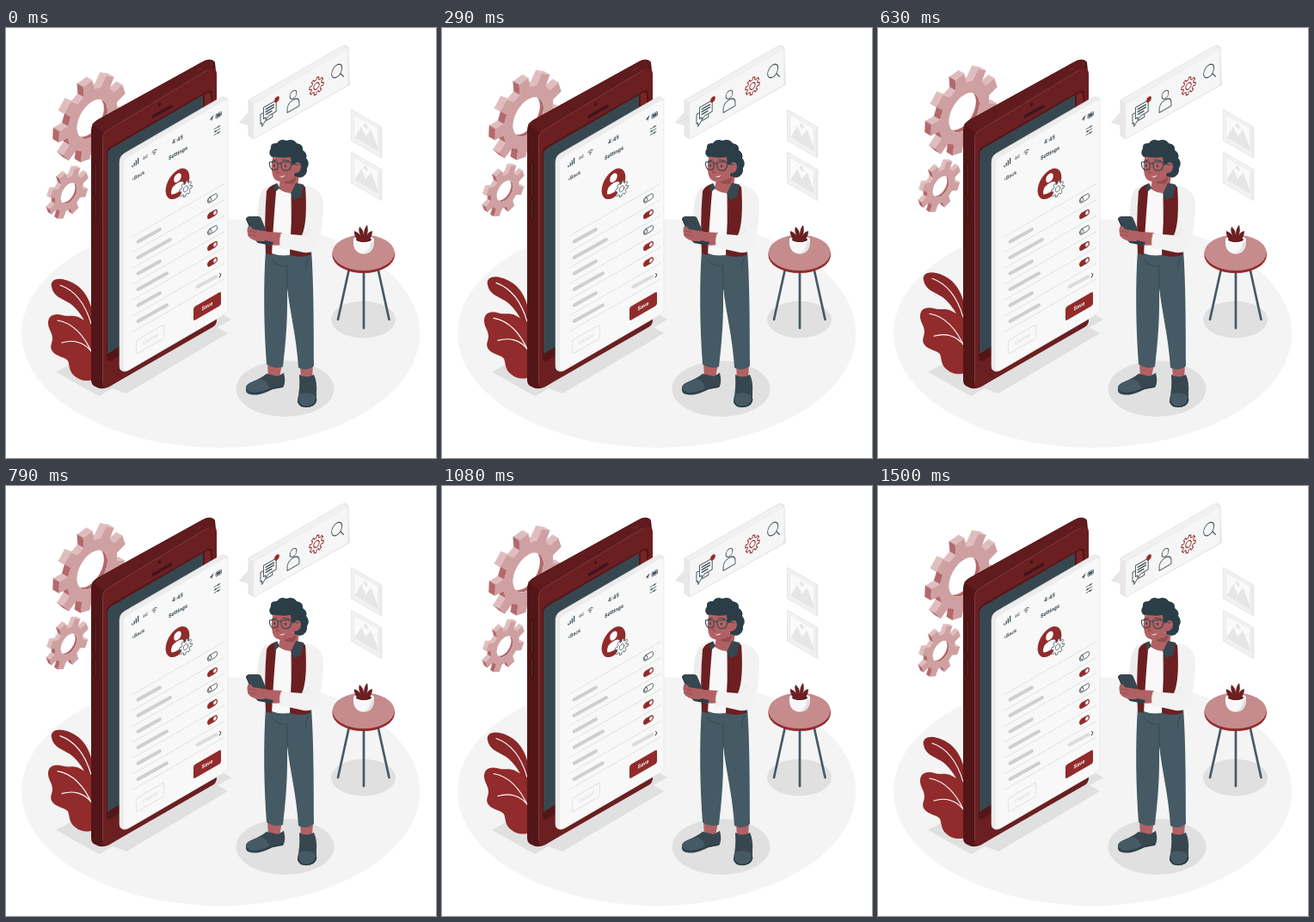
Write an HTML page with a canvas that moves like this. It is 500 by 500 pixels and loops after 1.54 s.

```html
<!DOCTYPE html>
<html lang="en">
<head>
<meta charset="utf-8">
<title>Settings</title>
<style>
html, body { margin: 0; width: 100%; height: 100%; overflow: hidden; background: #fff; }
canvas { display: block; width: 500px; height: 500px; }
</style>
</head>
<body>
<canvas id="stage" width="500" height="500"></canvas>
<script>
const ctx = document.getElementById('stage').getContext('2d');
const LOOP = 1540, LIFT = 8.4;
const RED = '#922b2b', WINE = '#6b1f21', DEEP = '#531618';
const SLATE = '#455a64', INK = '#37474f', NIGHT = '#2b3e48';
const SKIN = '#b16163', FLOOR = '#f4f4f4', SHADE = '#e0e0e0';

function fill(color, d, rule) {
  ctx.fillStyle = color;
  ctx.fill(new Path2D(d), rule || 'nonzero');
}
function line(color, width, d) {
  ctx.strokeStyle = color;
  ctx.lineWidth = width;
  ctx.stroke(new Path2D(d));
}
function oval(color, x, y, rx, ry = rx, rot = 0) {
  ctx.beginPath();
  ctx.ellipse(x, y, rx, ry, rot, 0, Math.PI * 2);
  ctx.fillStyle = color;
  ctx.fill();
}
// Draws in an isometric wall plane; side = -1 for walls that rise to the right.
function iso(x, y, draw, side = -1) {
  ctx.save();
  ctx.transform(.866, .5 * side, 0, 1, x, y);
  draw();
  ctx.restore();
}
function label(text, x, y, size, color, weight = 700) {
  iso(x, y, () => {
    ctx.font = `${weight} ${size}px Inter, sans-serif`;
    ctx.textAlign = 'center';
    ctx.textBaseline = 'middle';
    ctx.fillStyle = color;
    ctx.fillText(text, 0, 0);
  });
}
function box(x, y, w, h, r, color, stroke, width = 1) {
  ctx.beginPath();
  ctx.roundRect(x, y, w, h, r);
  if (color) { ctx.fillStyle = color; ctx.fill(); }
  if (stroke) { ctx.strokeStyle = stroke; ctx.lineWidth = width; ctx.stroke(); }
}

function cogPoints(teeth, inner, outer, phase) {
  const step = Math.PI * 2 / teeth, points = [];
  for (let i = 0; i < teeth; i++) {
    const a = phase + i * step;
    for (const [k, r] of [[-.3, inner], [-.2, outer], [.2, outer], [.3, inner]]) {
      points.push([r * Math.cos(a + k * step), r * Math.sin(a + k * step)]);
    }
  }
  return points;
}
const pathOf = points => 'M' + points.map(p => p.join()).join('L') + 'Z';

function solidCog(cx, cy, teeth, inner, outer, hole, phase, dx, dy) {
  const project = ([u, v]) => [cx + .866 * u, cy - .5 * u - v];
  const flat = cogPoints(teeth, inner, outer, phase);
  const front = flat.map(project);
  const walls = front.map((p, i) => {
    const j = (i + 1) % front.length, q = front[j];
    return { p, q, side: (q[1] - p[1]) * dx - (q[0] - p[0]) * dy, up: flat[i][0] - flat[j][0] };
  }).sort((a, b) => b.p[0] + b.p[1] - a.p[0] - a.p[1]);
  for (const { p, q, side, up } of walls) {
    if (side >= 0) continue;
    const color = up > (outer - inner) * .45 ? '#dfbdbe' : '#b3696b';
    const d = pathOf([p, q, [q[0] + dx, q[1] + dy], [p[0] + dx, p[1] + dy]]);
    fill(color, d);
    line(color, .4, d);
  }
  const ring = [];
  for (let i = 0; i < 60; i++) {
    const a = i * Math.PI / 30;
    ring.push(project([hole * Math.cos(a), hole * Math.sin(a)]));
  }
  fill('#cfa0a1', pathOf(front) + pathOf(ring), 'evenodd');
  ctx.save();
  ctx.clip(new Path2D(pathOf(ring)));
  fill('#b3696b', pathOf(ring));
  fill('#fff', pathOf(ring.map(([x, y]) => [x + dx * .6, y + dy * .6])));
  ctx.restore();
}

function leaves() {
  fill('#8a2729', 'M53 301C51 293 60 290 69 293C85 297 96 310 100 328V352L94 346C88 333 82 326 74 320C64 314 55 312 53 301Z');
  line('#fff', 1.1, 'M63 299C80 305 92 320 99 344');
  fill(RED, 'M49 343C49 334 56 331 66 334C74 336 79 333 86 337C94 341 100 346 104 352V408C95 412 85 410 79 404C73 399 74 391 72 387C68 382 58 382 54 376C50 370 54 367 54 361C54 354 49 350 49 343Z');
  line('#fff', 1.1, 'M60 340C78 343 91 357 101 380M65 366C78 362 91 365 100 377');
}

function ground() {
  oval(FLOOR, 249.7, 355, 231.5, 133);
  oval(SHADE, 415.5, 339, 37.5, 21.5);
  oval(SHADE, 324.5, 419.5, 57, 32.5);
  fill(SHADE, 'M58 400L108 428L124 419L140 425L258 355L246 348L262 339L248 331L100 377Z');
}

function phone() {
  fill(DEEP, 'M99 119Q99 111 106 107L229 39Q238 34 243 40L245 60V340L120 417Q112 421 106 418L102 416Q99 414 99 409Z');
  fill('#5f1b1d', 'M100 112L106 107L229 39Q238 34 243 40L240 47L114 122Z');
  fill(WINE, 'M112 130Q112 123 118 119L234 49Q245 43 245 54V340Q245 345 240 348L120 417Q112 421 112 413Z');
  line('#8d5052', .6, 'M112.5 412V130Q112 123 118 119L234 49');
  fill(DEEP, 'M117 146Q117 141 121 138L233 74Q240 70 240 77V315L122 387Q117 389 117 383Z');
  fill(INK, 'M118 148Q118 143 122 140L229 78V310L118 379Z');
  fill('#7a2426', 'M231 77Q238 72 238 79V110H231Z');
  line('#41131a', 3.2, 'M171 103L192 91');
  oval('#41131a', 178.5, 88.5, 1.7, 2.1);
  line('#74282a', 1.2, 'M222 50L228 46.5');
  for (const d of ['M104.5 157V194', 'M104.5 201V221']) {
    line('#3f1013', 4, d);
    line('#70282a', 1.2, d);
  }
}

function toggle(y, on) {
  iso(240, y, () => {
    box(-6.5, -3.1, 13, 6.2, 3.1, on ? RED : '#fff', on ? RED : INK, .8);
    ctx.beginPath();
    ctx.arc(on ? 3.4 : -3.4, 0, 2.1, 0, 7);
    ctx.fillStyle = '#fff';
    ctx.fill();
    if (!on) { ctx.strokeStyle = INK; ctx.lineWidth = .7; ctx.stroke(); }
  });
}

function statusBar() {
  for (let i = 0; i < 4; i++) {
    const x = 147 + i * 2.2, base = 161.5 - i * 1.3;
    line(INK, 1.2, `M${x} ${base}V${base - 1.5 - i * 1.6}`);
  }
  label('4G', 162, 150.5, 5, INK, 500);
  iso(172.5, 145, () => {
    line(INK, .9, 'M-3 -1.7Q0 -4.2 3 -1.7M-1.7 .2Q0 -1.4 1.7 .2');
    oval(INK, 0, 1.8, .7);
  });
  label('4:45', 199.5, 130, 6.4, INK);
  iso(239, 105.5, () => fill(INK, 'M-3 0L3 -3L0 3L-.3 .3Z'));
  iso(247.5, 101, () => {
    box(-4, -2.3, 7.5, 4.8, 1, null, INK, .7);
    box(-3, -1.3, 5.5, 2.8, .5, INK);
  });
  label('‹Back', 154, 172, 6, INK, 600);
  label('Settings', 200, 145.5, 6.3, INK);
  iso(245.5, 119, () => {
    line(INK, .7, 'M-4 -3.4H4M-4 0H4M-4 3.4H4');
    for (const [x, y] of [[2, -3.4], [-2, 0], [1.5, 3.4]]) oval(INK, x, y, 1);
  });
}

function panel() {
  const outline = 'M132 156Q132 149 138 145.5L250 80.5Q254 78.5 258 83V327Q258 331 254 333L144 397Q138 401 134 398Q132 397 132 393Z';
  fill('#ececec', outline);
  fill('#f8f8f8', 'M137 158Q137 153 142 150L253 85Q258 82 258 87V327Q258 331 254 333L144 397Q137 401 137 394Z');
  line('#e2e2e2', .6, outline);
  statusBar();

  iso(199.5, 181.2, () => {
    oval(RED, 0, 0, 16);
    oval('#fff', 0, -7, 4.9);
    fill('#fff', 'M-8.5 8V4.5Q-8 -1 0 -1Q8 -1 8.5 4.5V8Q0 12 -8.5 8Z');
  });
  iso(209, 187, () => {
    const cog = pathOf(cogPoints(8, 6.3, 8.7, .2));
    fill('#fff', cog);
    line(INK, .7, cog);
    line(INK, .7, 'M3.2 0A3.2 3.2 0 1 1 -3.2 0A3.2 3.2 0 1 1 3.2 0Z');
  });

  const ends = [179, 191, 179, 187, 179, 187];
  for (let i = 0; i < 7; i++) {
    const y = 242 + i * 18.5;
    line('#dcdcdc', .8, `M148 ${y}L254 ${y - 61}`);
    if (i < 6) line('#cfcfcf', 4, `M153.5 ${y + 6.5}L${ends[i]} ${y + 6.5 - (ends[i] - 153.5) * .56}`);
  }
  [0, 1, 0, 1, 1].forEach((on, i) => toggle(198 + i * 18.5, on));
  line('#dcdcdc', 4, 'M222.5 301L244.5 289');
  line(INK, 1, 'M248.3 285.5L250 286.5L248.3 290');

  iso(234, 323.5, () => box(-18.5, -8, 37, 16, 2.5, RED));
  label('Save', 234, 323.5, 6.2, '#fff');
  iso(167.5, 362, () => box(-18.5, -8, 37, 16, 2.5, null, '#dedede', .9));
  label('Cancel', 167.5, 362, 6, '#d8d8d8', 500);
}

function toolbar() {
  fill('#e8e8e8', 'M282 84L391 21Q395 19 398 23L400 66L288 129L282 125V113L272 110L282 98Z');
  fill('#f1f1f1', 'M282 84L391 21L398 24L288 87Z');
  fill('#f6f6f6', 'M288 88L395 26Q398 24 398 28V63Q398 66 395 68L288 129Z');
  line('#dedede', .7, 'M282 98V84L391 21Q395 19 398 23V63Q398 66 395 68L288 129L282 125V113L272 110ZM272 110L288 104');
  iso(305.5, 98, () => {
    line(INK, 1, 'M-7 -9H10V4H0L-4 7V4H-7Z');
    line(INK, 1.3, 'M-4 -5.5H7M-4 -2.5H7M-4 .5H4');
    line(INK, 1, 'M-8 -3H-11V8H-9V12L-5 8H5V5');
  });
  iso(315, 83, () => oval(RED, 0, 0, 3.3));
  iso(334, 84.5, () => {
    line(INK, 1, 'M4.5 -7A4.5 4.5 0 1 1 -4.5 -7A4.5 4.5 0 1 1 4.5 -7ZM-8 10V5Q-7 -1 0 -1Q7 -1 8 5V10Z');
  });
  iso(361, 67.5, () => {
    line(RED, 1.1, pathOf(cogPoints(8, 7, 9.6, .2)));
    line(RED, 1.1, 'M3.7 0A3.7 3.7 0 1 1 -3.7 0A3.7 3.7 0 1 1 3.7 0Z');
  });
  iso(384.7, 50, () => line(INK, 1, 'M7 0A7 7 0 1 1 -7 0A7 7 0 1 1 7 0ZM4.7 5L9 11'));
}

function picture(x, y) {
  iso(x, y, () => {
    box(0, 0, 42, 37, 0, '#e9e9e9');
    box(1.5, 1.5, 37, 34, 0, '#f3f3f3');
    box(4.5, 4.5, 32, 28, 0, '#fafafa', '#e6e6e6', .7);
    fill('#e6e6e6', 'M5 31L14 13L20 22L27 11L36 26V31Z');
    oval('#e6e6e6', 20, 10, 2.8);
  }, 1);
}

function table() {
  line(SLATE, 2.7, 'M399 280L386 339M416 282V349M432.5 280L445.5 339');
  oval(RED, 415.7, 263.7, 36.3, 21.4);
  oval('#c68b8d', 415.7, 261.2, 36, 20.8);
  fill('#e3e3e3', 'M404 246H428Q429 262 416 263Q403 262 404 246Z');
  fill('#f8f8f8', 'M404 246H424Q425 260 414 262Q403 260 404 246Z');
  oval('#fff', 416, 246, 12, 4.5);
  oval(DEEP, 416, 246, 9, 3);
  fill(WINE, 'M411 248Q404 243 405 236Q411 238 413 243Q409 236 411 231Q416 235 416 241Q416 233 420 229Q422 236 419 242Q421 237 426 236Q426 244 420 248Q416 250 411 248Z');
}

function legs() {
  fill(SKIN, 'M304 390H321L318 407H305ZM342 390H357L356 409H343Z');
  fill(INK, 'M279 418C281 411 292 411 303 402L316 405L323 401Q326 412 322 418L310 420C302 424 294 428 284 426Q278 425 279 418Z');
  fill(SLATE, 'M279 417C282 411 291 411 296 408Q305 411 306 419C298 424 286 426 280 421Z');
  line(NIGHT, 1.4, 'M279.5 421C286 429 299 423 309 419.5L322 416.5');
  fill(INK, 'M341 403Q349 408 358 403Q362 411 361 424V434Q359 441 349 441Q339 440 339 432Q342 421 341 403Z');
  fill(SLATE, 'M341 426Q350 422 359 427Q362 439 349 440Q338 439 341 426Z');
  line(NIGHT, 1.4, 'M339.5 434Q341 440.5 349 440.5Q359 440 360.8 432');
  fill(SLATE, 'M302 258H355C357.5 290 358 340 358 393Q349 400 340 395C338 360 330 330 327 302C327 320 328 345 322 394Q312 397 303 391C300 350 299 300 302 258Z');
  line(INK, 1, 'M326 275Q328 290 327 304M309 269Q312 275 323 277M352 267Q347 274 349 281');
}

function torso() {
  fill('#ededed', 'M304 184Q296 188 294 201C292 215 291 228 293 237L306 239Z');
  fill('#f8f8f8', 'M311 183L330 184L338 200V262Q322 267 309 262Z');
  fill(WINE, 'M314 181Q305 184 303 190Q300 225 302 262L309 264Q311 225 314 190Z');
  fill(WINE, 'M332 190L345 182Q352 187 353 202L354 264Q343 268 330 264Q333 225 332 190Z');
  line('#521518', .8, 'M332 195Q333 226 331 261');
}

function arms() {
  fill(SKIN, 'M321 238L305 237Q296 234 289 233L281 232Q279 238 284 244L293 247Q306 255 321 252Z');
  fill(NIGHT, 'M287 244L311 249L309 253L293 250Z');
  fill(INK, 'M279 222Q280 219 283 219L293 219Q296 219 297 222L302 234Q302 237 299 237L288 237Q285 236 284 234Z');
  line(NIGHT, 1.2, 'M279.5 222L285 234Q286 237 289 237L299 237');
  fill(SKIN, 'M281 231Q285 229 287 234L300 236Q309 238 310 242L300 248Q286 249 281 241Z');
  line('#8e4547', .7, 'M283 236L291 238M283 240L291 242');
  fill('#f2f2f2', 'M348 183C359 184 369 192 369 204C369 225 366 244 361 256Q358 262 346 261L319 255Q317 247 320 239L344 241Q351 226 348 183Z');
  line('#dddddd', .8, 'M344 241Q350 240 353 233M319 255Q317 247 320 239');
}

function head() {
  fill(SKIN, 'M320 171H341L338 190Q329 195 317 187Z');
  fill('#944d4f', 'M321 178Q331 179 338 172L335 181Q329 183 321 178Z');
  fill(INK, 'M337 180L346 182L343 197L335 200L331 193Z');
  fill(INK, 'M315 180L311 186L313 191L318 186Z');
  fill(NIGHT, 'M311 151Q303 147 308 140Q307 133 315 134Q319 128 326 131Q334 128 338 134Q346 135 345 142Q351 146 349 151Q354 157 350 163Q351 172 342 174L335 172L331 152Z');
  fill(SKIN, 'M311 148Q320 152 331 147Q333 155 336 157Q343 154 343 162Q342 169 335 169Q332 178 322 179Q312 179 310 171Q307 160 311 148Z');
  fill(NIGHT, 'M308 149Q307 139 315 137L333 137L337 157L333 160Q331 156 331 150Q321 152 308 149Z');
  line(NIGHT, 1.1, 'M309 155.5L314 153.5M322 153.5L329 154.5');
  line(INK, 1.1, 'M306.5 156H316V162Q315 165 311 165Q307 164 306.5 159ZM320 156H331.5V161Q330 166 325 166Q320 165 320 160ZM316 158Q318 157 320 158M331 158L340 159');
  oval(NIGHT, 312, 160, 1, 1.4);
  oval(NIGHT, 325, 160.5, 1, 1.4);
  line('#8c4143', .8, 'M317 160L314.5 168L318 168.5');
  fill('#fff', 'M317 172.5Q321 173.5 324.5 171Q322.5 175 317 172.5Z');
}

function draw(now) {
  const rise = LIFT * (1 - Math.cos(now / LOOP * Math.PI * 2)) / 2;
  ctx.fillStyle = '#fff';
  ctx.fillRect(0, 0, 500, 500);
  ctx.lineCap = ctx.lineJoin = 'round';
  ground();
  ctx.save();
  ctx.translate(0, -rise);
  solidCog(100.3, 106, 9, 33.5, 45, 20.5, .31, -7, -4);
  solidCog(73.3, 192.3, 8, 19, 26.5, 11, .34, -4, -2.4);
  leaves();
  ctx.restore();
  phone();
  panel();
  toolbar();
  picture(401, 94);
  picture(401, 143.5);
  table();
  legs();
  torso();
  head();
  arms();
}

let start;
function tick(now) {
  start ??= now;
  draw((now - start) % LOOP);
  requestAnimationFrame(tick);
}
draw(0);
requestAnimationFrame(tick);
</script>
</body>
</html>
```
